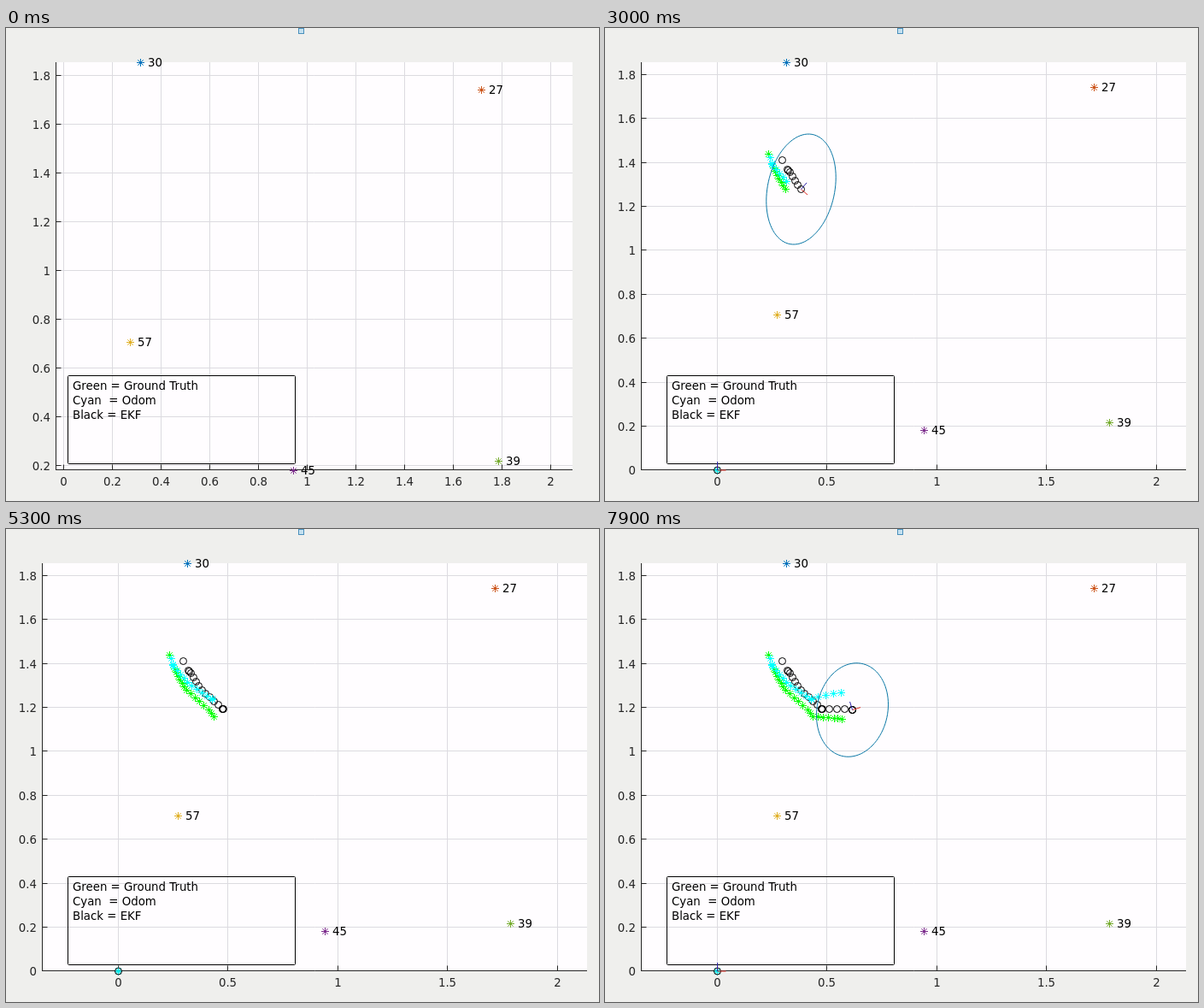
An HTML page with a canvas that plays this animation: 694 by 553 pixels, repeating every 8000 ms.

```html
<!DOCTYPE html>
<html lang="en">
<head>
<meta charset="utf-8">
<style>
  html, body { margin: 0; width: 100%; height: 100%; overflow: hidden; background: #efefed; }
  canvas { display: block; }
</style>
</head>
<body>
<canvas id="plot" width="694" height="553"></canvas>
<script>
const ctx = document.getElementById('plot').getContext('2d');
const LOOP = 8000, UPDATES = 21, TOP = 40, BOTTOM = 516.5, INK = '#262626', GRID = '#dcdbe0';

const landmarks = [
  ['30', 0.315, 1.853, '#0072bd'], ['27', 1.718, 1.741, '#cc551c'], ['57', 0.274, 0.707, '#e0b028'],
  ['45', 0.943, 0.18, '#7e2f8e'], ['39', 1.787, 0.216, '#77ac30'],
];

// Axes before and after the robot appears: edges, pixel of the zero point, pixels per unit, ticks.
const wideView = { left: 58.5, right: 663, x0: 67.7, y0: 568.4, scale: 284.7, stepX: 0.2, firstY: 1 };
const trackView = { left: 42.5, right: 680, x0: 131.2, y0: 517, scale: 257.1, stepX: 0.5, firstY: 0 };

// Key poses: update number, ms, ms without ellipse, then x, y of truth, odometry and filter, heading.
const keys = [
  [1, 800, 100, 191, 147, 193, 151, 207, 154, -62],
  [2, 1200, 100, 197, 163, 195, 158, 213, 165, -60],
  [4, 1700, 300, 201, 172, 196, 161, 216, 168, -56],
  [8, 2900, 100, 211, 188, 212, 179, 229, 188, -41],
  [13, 4400, 200, 237, 211, 241, 199, 253, 210, -38],
  [15, 5300, 100, 243, 219, 241, 198, 254, 210, 0],
  [19, 7000, 100, 268, 221, 276, 191, 289, 211, 0],
  [UPDATES, 7800, 100, 277, 222, 276, 191, 289, 211, 17],
];

const snap = v => Math.floor(v) + 0.5;

function updateAt(n) {
  const i = Math.max(1, keys.findIndex(key => key[0] >= n));
  const a = keys[i - 1], b = keys[i], f = (n - a[0]) / (b[0] - a[0]);
  const [, ms, hidden, tx, ty, ox, oy, fx, fy, heading] = a.map((v, k) => v + (b[k] - v) * f);
  return {
    ms, hidden, heading,
    truth: [snap(tx), snap(ty)], odom: [snap(ox), snap(oy)], filter: [snap(fx), snap(fy)],
    // Uncertainty shrinks vertically and slowly loses its tilt.
    rx: 39.2 + 0.05 * (n - 13.5) ** 2,
    ry: 70.5 - 0.75 * n,
    skew: -0.08 - 0.3 * Math.exp(-n / 10),
  };
}
const updates = Array.from({ length: UPDATES }, (_, i) => updateAt(i + 1));

function line(x1, y1, x2, y2, color) {
  ctx.strokeStyle = color;
  ctx.beginPath();
  ctx.moveTo(x1, y1);
  ctx.lineTo(x2, y2);
  ctx.stroke();
}

function text(str, x, y, align = 'left', color = '#000') {
  ctx.font = '13.33px "DejaVu Sans", sans-serif';
  ctx.textAlign = align;
  ctx.fillStyle = color;
  ctx.fillText(str, x, y);
}

function star(x, y, color) {
  for (const [dx, dy] of [[4.5, 0], [0, 4.5], [3.2, 3.2], [3.2, -3.2]]) {
    line(x - dx, y - dy, x + dx, y + dy, color);
  }
}

function circle(x, y) {
  ctx.strokeStyle = '#000';
  ctx.beginPath();
  ctx.arc(x, y, 4, 0, 2 * Math.PI);
  ctx.stroke();
}

function triad(x, y, degrees) {
  const a = degrees * Math.PI / 180, dx = 10 * Math.cos(a), dy = -10 * Math.sin(a);
  line(x, y, x + dx, y + dy, '#e03028');
  line(x, y, x + dy, y - dx, '#2a20a8');
}

function ellipse(cx, cy, rx, ry, skew) {
  ctx.strokeStyle = '#0b78a6';
  ctx.beginPath();
  for (let i = 0; i < 90; i++) {
    const t = i * Math.PI / 45;
    ctx.lineTo(cx + rx * Math.cos(t), cy + ry * Math.sin(t + skew));
  }
  ctx.closePath();
  ctx.stroke();
}

function drawAxes({ left, right, x0, y0, scale, stepX, firstY }) {
  ctx.fillStyle = '#fffdff';
  ctx.fillRect(left, TOP, right - left, BOTTOM - TOP);

  const xs = [], ys = [];
  for (let i = 0; i * stepX < 2.01; i++) xs.push([snap(x0 + i * stepX * scale), +(i * stepX).toFixed(1)]);
  for (let i = firstY; i <= 9; i++) ys.push([Math.min(snap(y0 - i * 0.2 * scale), BOTTOM), +(i * 0.2).toFixed(1)]);

  for (const [x] of xs) line(x, TOP, x, BOTTOM, GRID);
  for (const [y] of ys) line(left, y, right, y, GRID);
  line(left, TOP, left, BOTTOM + 0.5, INK);
  line(left, BOTTOM, right, BOTTOM, INK);
  for (const [x, label] of xs) {
    line(x, BOTTOM, x, BOTTOM - 6, INK);
    text(label, x, 535, 'center', INK);
  }
  for (const [y, label] of ys) {
    line(left, y, left + 6, y, INK);
    text(label, left - 6.5, y + 5, 'right', INK);
  }
  for (const [label, x, y, color] of landmarks) {
    const px = snap(x0 + x * scale), py = snap(y0 - y * scale);
    star(px, py, color);
    text(label, px + 8.5, py + 4.5);
  }
}

function drawLegend() {
  ctx.strokeStyle = '#000';
  ctx.beginPath();
  ctx.roundRect(72.5, 406.5, 266, 103, 1);
  ctx.stroke();
  ['Green = Ground Truth', 'Cyan  = Odom', 'Black = EKF'].forEach((s, i) => text(s, 78, 423 + 17 * i));
}

function drawRobot(done, ms) {
  for (const { truth, odom, filter } of done) {
    star(...truth, '#0f0');
    star(...odom, '#0ff');
    circle(...filter);
  }
  const origin = [131.5, 517];
  star(...origin, '#0ee');
  star(...origin, '#0ee');
  circle(...origin);

  const last = done[done.length - 1];
  if (ms < last.ms + last.hidden) return;
  triad(...origin, 0);
  triad(...last.filter, last.heading);
  ellipse(...last.filter, last.rx, last.ry, last.skew);
}

function draw(ms) {
  const done = updates.filter(update => update.ms <= ms);
  ctx.lineWidth = 1;
  ctx.fillStyle = '#efefed';
  ctx.fillRect(0, 0, 694, 553);
  ctx.fillStyle = '#c4e0f0';
  ctx.fillRect(342.5, 0.5, 6, 6);
  ctx.strokeStyle = '#4a90bc';
  ctx.strokeRect(342.5, 0.5, 6, 6);
  drawAxes(done.length ? trackView : wideView);
  drawLegend();
  if (done.length) drawRobot(done, ms);
}

const start = performance.now();
function tick() {
  draw((performance.now() - start) % LOOP);
  requestAnimationFrame(tick);
}
tick();
</script>
</body>
</html>
```
